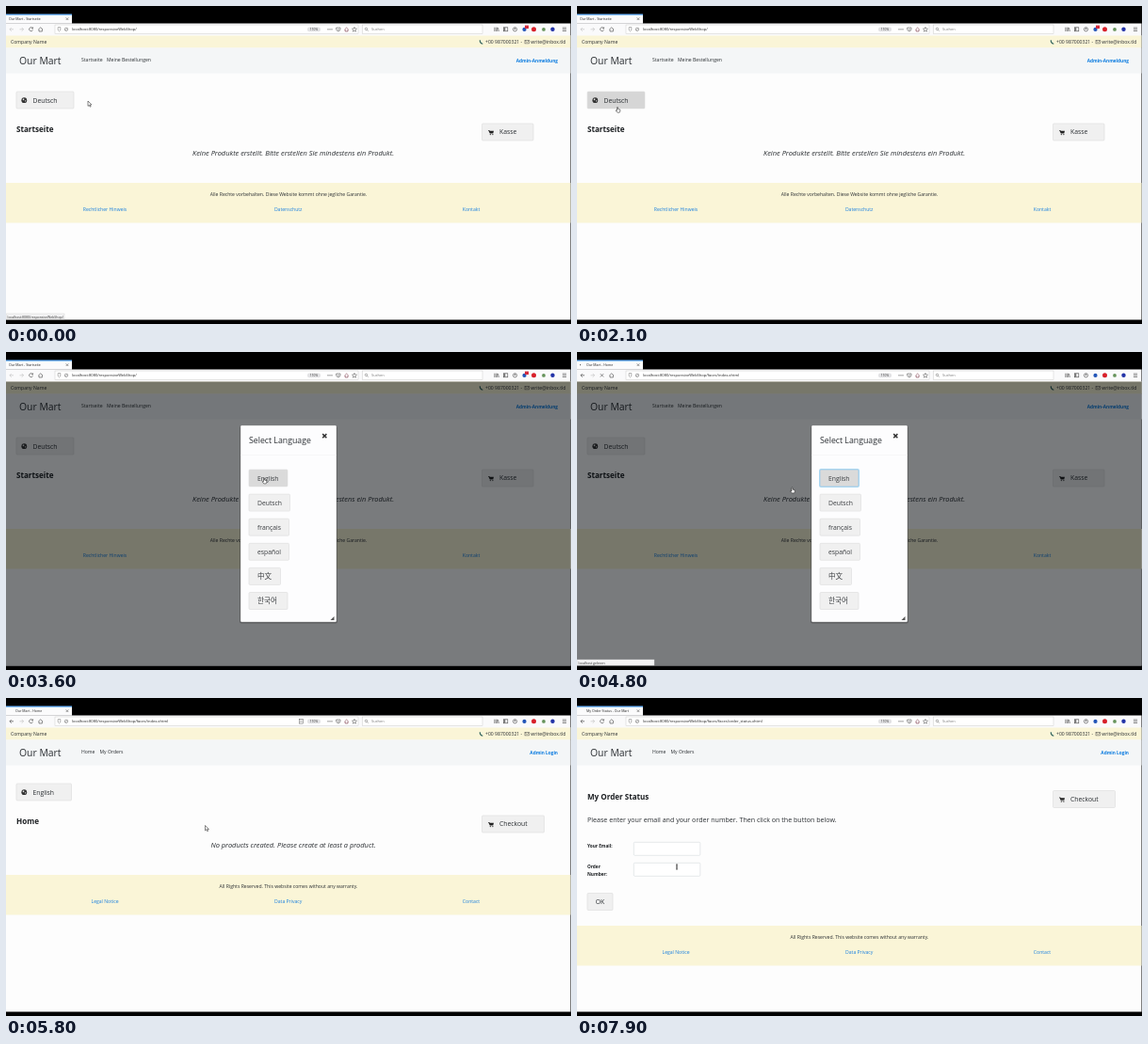
Recreate the animation shown at these times as an HTML page. Size 600 by 338 pixels, loop 8000 ms.

```html
<!DOCTYPE html>
<html lang="de">
<head>
<meta charset="utf-8">
<title>Web shop demo</title>
<style>
html, body { margin: 0; width: 100%; height: 100%; overflow: hidden; background: #000; }
svg { display: block; width: 100vw; height: 100vh; }
text { font-family: "Open Sans", "Noto Sans CJK SC", "Noto Sans CJK KR", sans-serif; white-space: pre; }
</style>
</head>
<body>
<svg viewBox="0 0 600 338"><g id="screen"></g><g id="cursor"></g></svg>
<script>
const LOOP = 8000;
const SHOP = 'Our Mart', HOST = 'localhost:8080/responsiveWebShop/';
const INK = '#2b2f33', LINK = '#1a80e0', CREAM = '#faf5d7';
const RIGHT = 599.5, TOP = 31.5, HEIGHT = 302;

// Times of the hard changes
const T = { statusOff: 150, dialog: 2150, dialogReady: 2400, click: 4200, newUrl: 4550,
  english: 4900, load: 6350, orders: 6500 };

const WORDS = {
  de: { home: 'Startseite', orders: 'Meine Bestellungen', ordersX: 107, admin: 'Admin-Anmeldung',
    lang: 'Deutsch', langW: 61, cart: 'Kasse', cartW: 54.5,
    empty: 'Keine Produkte erstellt. Bitte erstellen Sie mindestens ein Produkt.',
    rights: 'Alle Rechte vorbehalten. Diese Website kommt ohne jegliche Garantie.',
    links: ['Rechtlicher Hinweis', 'Datenschutz', 'Kontakt'] },
  en: { home: 'Home', orders: 'My Orders', ordersX: 99.5, admin: 'Admin Login',
    lang: 'English', langW: 58.5, cart: 'Checkout', cartW: 66,
    empty: 'No products created. Please create at least a product.',
    rights: 'All Rights Reserved. This website comes without any warranty.',
    links: ['Legal Notice', 'Data Privacy', 'Contact'] }
};

// Pointer stops: time, x, y
const STOPS = [[0, 87, 101], [1000, 427, 111], [2050, 43, 107.3], [2500, 43, 107.3],
  [3500, 274, 134], [4300, 274, 134], [4800, 228.5, 144], [5600, 211.5, 135.5], [5800, 211.5, 135.5],
  [6250, 112, 57], [6450, 112, 57], [6800, 130, 161.5], [7900, 106, 179.5], [LOOP, 106, 179.5]];

function pointerAt(t) {
  const i = STOPS.findIndex(s => s[0] > t), [t0, x0, y0] = STOPS[i - 1], [t1, x1, y1] = STOPS[i];
  const u = (t - t0) / (t1 - t0), k = u * u * (3 - 2 * u);
  return { x: x0 + (x1 - x0) * k, y: y0 + (y1 - y0) * k };
}
const over = (p, x, y, w, h) => p.x >= x && p.x <= x + w && p.y >= y && p.y <= y + h;

function hovers(t, p) {
  const open = t >= T.dialog && t < T.english, german = t < T.english;
  return {
    language: german && over(p, 11, 91, 61, 18),
    choice: open && over(p, 258, 125, 41, 18),
    orders: !german && t < T.orders && over(p, 98, 52, 28, 10)
  };
}

const text = (x, y, size, str, fill = INK, more = '') =>
  `<text x="${x}" y="${y}" font-size="${size}" fill="${fill}" ${more}>${str}</text>`;
const bold = (x, y, size, str, fill = '#1c1f22', more = '') =>
  text(x, y, size, str, fill, 'font-weight="700" ' + more);
const MIDDLE = 'text-anchor="middle"', END = 'text-anchor="end"';
const rect = (x, y, w, h, fill, more = '') =>
  `<rect x="${x}" y="${y}" width="${w}" height="${h}" fill="${fill}" ${more}/>`;
const dot = (x, y, r, fill, more = '') =>
  `<circle cx="${x}" cy="${y}" r="${r}" fill="${fill}" ${more}/>`;
const line = (d, color = '#444', width = .6) =>
  `<path d="${d}" fill="none" stroke="${color}" stroke-width="${width}"/>`;
const button = (x, y, w, fill = '#f0f0f0', border = '#dcdcdc') =>
  rect(x, y, w, 18, fill, `rx="1" stroke="${border}" stroke-width=".6"`);

const globe = (x, y) => dot(x, y, 2.9, '#333') +
  `<path d="M${x - 1.8} ${y - 1.2}l1.5 -.8 .5 1 -1.2 1.2zM${x + .6} ${y + .2}l1.4 -.2 -.7 1.7z" fill="#eee"/>`;
const cart = (x, y) => `<path d="M${x - 3} ${y - 2.4}h1.2l.4 .8h4.4l-.6 2.4h-3.6z" fill="#222"/>` +
  line(`M${x - 1.8} ${y - 2}l.8 3.3h3.4`, '#222', .5) +
  dot(x - .7, y + 2.3, .6, '#222') + dot(x + 1.9, y + 2.3, .6, '#222');
const cross = (x, y, r, color, width) =>
  line(`M${x - r} ${y - r}l${2 * r} ${2 * r}m0 ${-2 * r}l${-2 * r} ${2 * r}`, color, width);

function browser(t) {
  const loading = (t >= T.click && t < T.english) || (t >= T.load && t < T.orders);
  const moved = t >= T.newUrl, orders = t >= T.orders;
  const title = orders ? 'My Order Status - ' + SHOP : `${SHOP} - ${moved ? 'Home' : 'Startseite'}`;
  const path = orders ? 'faces/faces/order_status.xhtml' : moved ? 'faces/index.xhtml' : '';
  const back = moved ? '#333' : '#bbb';
  let s = rect(0, 0, 600, 338, '#000') + rect(0, 8.7, 70, 10, '#fbfbfc') + rect(0, 8.7, 70, .8, '#0a84ff') +
    text(moved ? 10 : 3, 15.2, 3.55, title, '#222') + cross(65, 13.7, 1.3, '#333', .5) +
    rect(0, 18.5, RIGHT, 13.5, '#fafafb');
  if (loading) s += dot(3.5 + Math.floor(t / 200) % 2 * 2, 13.7, .6, '#555');
  // navigation buttons
  s += line('M8 24.8h-4m1.8 -1.9l-1.9 1.9 1.9 1.9', back) +
    line('M14.5 24.8h4m-1.8 -1.9l1.9 1.9 -1.9 1.9', '#bbb') +
    (loading ? cross(26.5, 24.8, 1.7, '#444', .6)
             : line('M28.3 23.6a2 2 0 1 0 .2 1.8M28.6 22.4v1.5h-1.6')) +
    line('M34.3 25l2.4 -2.2 2.4 2.2M35 24.8v2.2h3.4v-2.2');
  // address and search fields
  s += rect(52, 20, 322, 9.6, '#fff', 'stroke="#ccc" stroke-width=".5"') +
    line('M55.2 22.6h2.6v2.2q0 1.4 -1.3 2.2q-1.3 -.8 -1.3 -2.2z', '#666', .5) +
    dot(64, 24.8, 1.7, 'none', 'stroke="#555" stroke-width=".5"') + line('M62.8 26l2.4 -2.4', '#555', .4) +
    text(70, 26.2, 4.05, HOST + path, '#222') +
    rect(320, 22.5, 14, 4.8, '#e3e3e5', 'rx="2"') + text(327, 26, 3.3, '110%', '#333', MIDDLE);
  if (t >= T.english && !orders)
    s += rect(311.5, 22.7, 3.8, 4.4, 'none', 'stroke="#555" stroke-width=".5"') + line('M312.3 24h2.2m-2.2 1.4h2.2', '#555', .4);
  s += [342, 344, 346].map(x => dot(x, 24.8, .6, '#444')).join('') +
    line('M350.7 23h4.3v2q-.6 1.8 -2.1 1.8t-2.2 -1.8zM351.8 24.4l1.1 1 1.1 -1', '#555') +
    line('M359.4 25.2l2.2 -2.2 2.2 2.2M360.2 25v2h2.8v-2', '#734') +
    line('M370 22.4l.7 1.6 1.8 .2 -1.4 1.2 .5 1.8 -1.6 -.9 -1.6 .9 .5 -1.8 -1.4 -1.2 1.8 -.2z', '#444', .5) +
    rect(378.5, 20, 127.5, 9.6, '#fff', 'stroke="#ccc" stroke-width=".5"') +
    dot(382.5, 24.4, 1.2, 'none', 'stroke="#555" stroke-width=".5"') + line('M383.4 25.3l1.3 1.3', '#555', .5) +
    text(388, 26.2, 4, 'Suchen', '#777');
  // toolbar
  s += line('M518.8 22.7v4.3m1.4 -4.3v4.3m1.4 -4.3v4.3m.8 -4l1 4', '#444') +
    rect(528.4, 22.8, 4.4, 4, 'none', 'stroke="#444" stroke-width=".6"') + rect(528.6, 23, 1.7, 3.6, '#777') +
    dot(540.5, 24.8, 2.1, 'none', 'stroke="#444" stroke-width=".6"') + dot(540.5, 24.3, .7, '#444') +
    dot(550.5, 24.9, 2.1, '#2456b8') + (moved ? '' : rect(551, 20.6, 4, 3.4, '#d42a3c')) +
    dot(560.5, 24.8, 2.5, '#d8202a') + dot(571, 24.9, 1.9, '#66935b') + dot(580.5, 24.8, 2.2, '#2434a8') +
    line('M590.9 23.1h4.2m-4.2 1.7h4.2m-4.2 1.7h4.2');
  return s;
}

function footer(w, y) {
  return rect(0, y, RIGHT, 42.5, CREAM) + text(300, y + 14, 5.1, w.rights, INK, MIDDLE) +
    w.links.map((s, i) => text([105, 299.7, 494][i], y + 30.2, 5.1, s, LINK, MIDDLE)).join('');
}

function page(t, hover) {
  const w = WORDS[t < T.english ? 'de' : 'en'], orders = t >= T.orders;
  let s = rect(0, TOP, RIGHT, HEIGHT, '#fdfdfd') + rect(0, TOP, RIGHT, 13, CREAM) + rect(0, 44.5, RIGHT, 27, '#f4f6f7') +
    text(5, 40, 5.1, 'Company Name') +
    line('M503.3 36.3q-.2 3.2 3 4', '#245a55', 1.1) + text(509, 40, 5.1, '+00 987000321 -') +
    rect(551, 36.5, 4.6, 3.4, 'none', 'stroke="#444" stroke-width=".5"') + line('M551 36.8l2.3 1.7 2.3 -1.7', '#444', .5) +
    text(594.5, 40, 5.1, 'write@inbox.tld', INK, END) +
    text(14, 62, 10.4, SHOP) + text(80, 59.3, 5.1, w.home) + text(w.ordersX, 59.3, 5.1, w.orders) +
    bold(586, 60.3, 4.75, w.admin, '#0a7be0', END);
  const cartY = orders ? 98.5 : 125;
  s += button(505.5, cartY, w.cartW) + cart(515, cartY + 9.3) + text(524, cartY + 11.4, 6.8, w.cart);
  if (!orders)
    return s + button(11, 91, w.langW, hover.language ? '#d6d6d6' : undefined) + globe(19.3, 100.2) +
      text(28.5, 102.5, 6.8, w.lang) + bold(11, 133.9, 8.1, w.home) +
      text(305, 158.8, 7.48, w.empty, INK, MIDDLE + ' font-style="italic"') + footer(w, 188);
  const field = y => rect(60.3, y, 70.5, 14, '#fff', 'rx="1" stroke="#d4d8dc" stroke-width=".6"');
  return s + bold(11, 107.7, 8.05, 'My Order Status') +
    text(11, 132.3, 7.1, 'Please enter your email and your order number. Then click on the button below.') +
    bold(11, 159.4, 4.75, 'Your Email:') + bold(11, 181.4, 4.75, 'Order') + bold(11, 189.4, 4.75, 'Number:') +
    field(153.3) + field(175.3) + button(11, 207.5, 27) + text(24.4, 219, 6.8, 'OK', INK, MIDDLE) + footer(w, 242);
}

function dialog(t, hover) {
  const choices = [['English', 41], ['Deutsch', 43.5], ['français', 42.5], ['español', 42.5], ['中文', 33.5], ['한국어', 41]];
  let s = rect(0, TOP, RIGHT, HEIGHT, '#000409', 'opacity=".52"') +
    rect(248, 78, 104, 210.5, '#000', 'rx="2" opacity=".25"') +
    rect(249, 78, 102, 209, '#fdfdfe', 'rx="1.2" stroke="#888" stroke-width=".4"') +
    line('M249 109.5h102', '#f3f3f5', .6) + text(258, 97.2, 8.75, 'Select Language');
  choices.forEach(([name, w], i) => {
    const y = 125 + i * 26.1, focus = i === 0 && t >= T.click, lit = focus || (i === 0 && hover.choice);
    if (focus) s += rect(257, y - 1, w + 2, 20, '#b5def5', 'rx="2"');
    s += button(258, y, w, lit ? '#dadada' : undefined, focus ? '#8cc4ea' : undefined) +
      text(267, y + 11.5, i < 4 ? 6.8 : 7.6, name, '#3a3d40');
  });
  if (t >= T.dialogReady)
    s += cross(338.3, 89.2, 2.1, '#333', 1.5) + '<path d="M348.5 281v4h-4z" fill="#555"/>';
  return s;
}

function status(t, hover) {
  const bar = (w, s) => rect(0, 327, w, 6, '#f3f3f4', 'stroke="#ccc" stroke-width=".4"') + text(1.5, 331.6, 3.5, s, '#333');
  if (t < T.statusOff) return bar(62, HOST);
  if (t >= T.click && t < T.english) return bar(82, t < T.newUrl ? 'Warten auf localhost…' : 'localhost gelesen');
  return hover.orders ? bar(112, HOST + 'faces/order_status.xhtml') : '';
}

const outlined = d => `<path d="${d}" fill="#fff" stroke="#111" stroke-width=".5" stroke-linejoin="round"/>`;
const POINTERS = {
  arrow: outlined('M0 0v5.4l1.3 -1.1 .9 1.9 .9 -.4 -.9 -1.8h1.7z'),
  hand: outlined('M-.5 .4q.5 -.8 1 0v1.7l2.2 .6q.5 1.8 -.5 3.2h-2.4l-1.8 -2.1q.4 -.8 1.5 .1z'),
  beam: line('M-1 -2.8q1 0 1 .8v4q0 .8 -1 .8M1 -2.8q-1 0 -1 .8v4q0 .8 1 .8', '#222', .6)
};

function pointer(t, { x, y }, hover) {
  const waiting = t >= T.click && t < T.english;
  const beam = t >= T.orders && y > 153;
  const shape = beam ? 'beam' : waiting || hover.language || hover.choice || hover.orders ? 'hand' : 'arrow';
  return `<g transform="translate(${x} ${y})">${POINTERS[shape]}</g>`;
}

const screenLayer = document.getElementById('screen'), cursorLayer = document.getElementById('cursor');
let shown = '';
function draw() {
  const t = performance.now() % LOOP, p = pointerAt(t), hover = hovers(t, p);
  const open = t >= T.dialog && t < T.english;
  const next = browser(t) + page(t, hover) + (open ? dialog(t, hover) : '') + status(t, hover);
  if (next !== shown) screenLayer.innerHTML = shown = next;
  cursorLayer.innerHTML = pointer(t, p, hover);
  requestAnimationFrame(draw);
}
draw();
</script>
</body>
</html>
```
